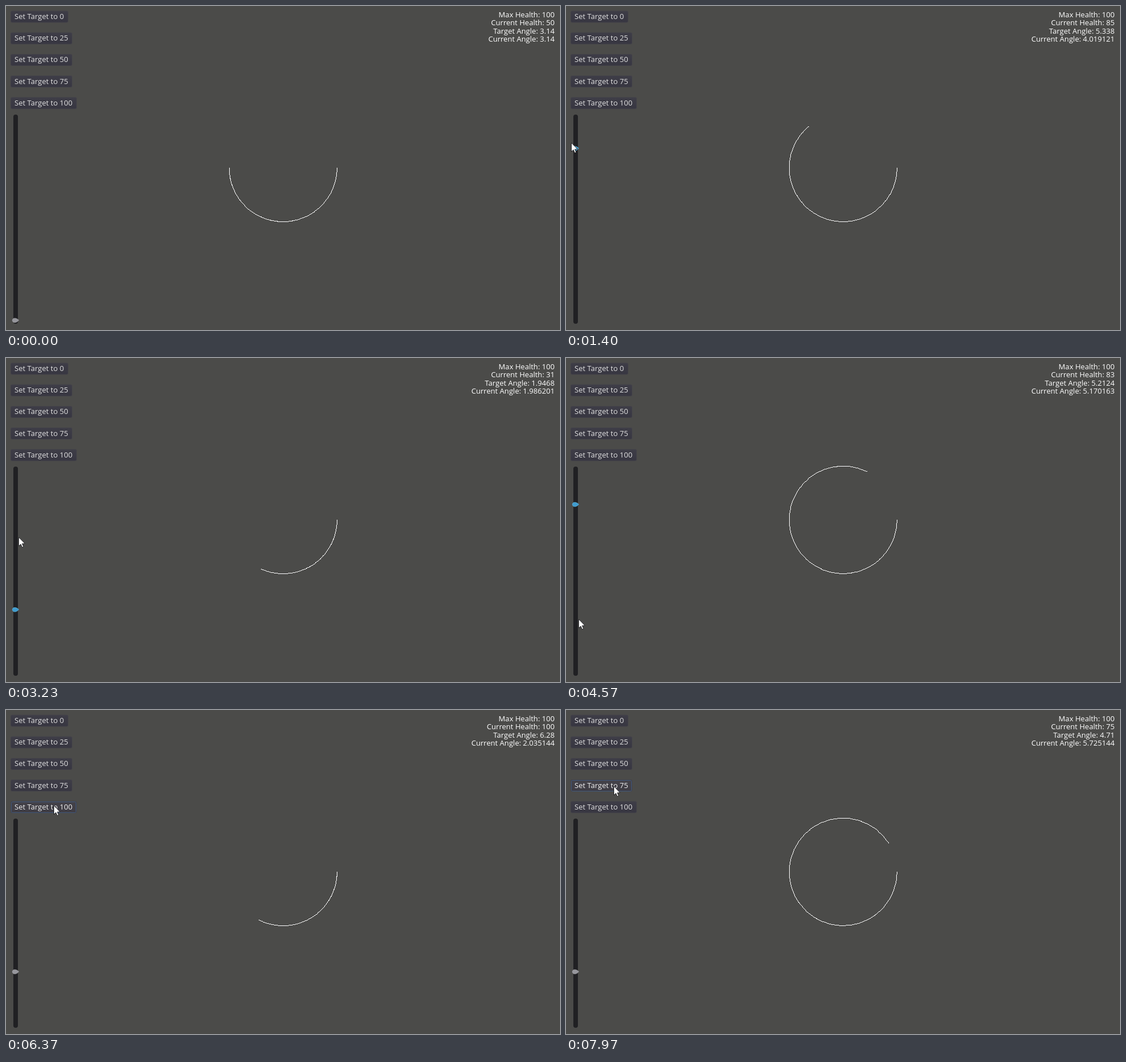
An HTML page with a canvas that plays this animation: 978 px wide and 573 px high, repeating every 8000 ms.

```html
<!DOCTYPE html>
<html lang="en">
<head>
<meta charset="utf-8">
<title>Health arc</title>
<style>
  html, body { margin: 0; width: 100%; height: 100%; overflow: hidden; background: #4b4b49; }
  canvas { display: block; }
</style>
</head>
<body>
<canvas id="stage" width="978" height="573"></canvas>
<script>
const ctx = document.getElementById('stage').getContext('2d');
const LOOP = 8000, SPEED = 6, TURN = 6.28;
const LEVELS = [0, 25, 50, 75, 100];

// Each click sets the health; the angle then runs at constant speed and rests at `rest`.
const clicks = [
  { at: 1253.4798, health: 85, rest: 5.319121, focus: 'slider' },
  { at: 2310, health: 31, rest: 1.986201, focus: 'slider' },
  { at: 3780, health: 83, rest: 5.170163, focus: 'slider' },
  { at: 4590, health: 26, rest: 1.725144, focus: 'slider' },
  { at: 6315, health: 100, rest: 6.18741, focus: 100 },
  { at: 7889.6223, health: 75, rest: 4.68741, focus: 75 }
];

// Pointer path: time, x, y
const path = [
  [430, 4, 292], [800, 8, 262], [1180, 9, 242], [1480, 9, 242],
  [2150, 21, 445], [2800, 22, 445], [3230, 22, 317], [3640, 22, 259],
  [3900, 22, 259], [4480, 22, 462], [4880, 22, 462], [5570, 82, 269],
  [6180, 84, 169], [6600, 84, 169], [7060, 84, 139], [7500, 84, 139], [7800, 84, 135]
];

function stateAt(t) {
  const s = { health: 50, slider: 0, angle: 3.14, focus: null };
  clicks.forEach((c, i) => {
    if (t < c.at) return;
    const end = Math.min(t, i + 1 < clicks.length ? clicks[i + 1].at : LOOP);
    const gap = c.rest - s.angle;
    const travel = SPEED * (end - c.at) / 1000;
    s.angle += Math.sign(gap) * Math.min(Math.abs(gap), travel);
    s.health = c.health;
    s.focus = c.focus;
    if (c.focus === 'slider') s.slider = c.health;
  });
  return s;
}

function pointerAt(t) {
  if (t < path[0][0]) return null;
  const i = path.findIndex(p => p[0] > t);
  if (i < 0) return path[path.length - 1].slice(1);
  const [t0, x0, y0] = path[i - 1], [t1, x1, y1] = path[i];
  const u = (t - t0) / (t1 - t0), e = u * u * (3 - 2 * u);
  return [x0 + (x1 - x0) * e, y0 + (y1 - y0) * e];
}

function roundBox(x, y, w, h, r) {
  ctx.beginPath();
  ctx.roundRect(x, y, w, h, r);
}

function label(text, x, y, color, align) {
  ctx.font = '13.1px "Open Sans", "Noto Sans", sans-serif';
  ctx.fillStyle = color;
  ctx.textAlign = align;
  ctx.fillText(text, x, y);
}

function drawButton(level, i, focus, mouse) {
  const y = 9 + i * 38.2;
  const w = level === 0 ? 101 : level === 100 ? 116 : 108;
  const hover = mouse && mouse[0] > 8 && mouse[0] < 8 + w && mouse[1] > y && mouse[1] < y + 20;
  roundBox(8, y - 0.5, w + 1, 21, 3);
  ctx.fillStyle = '#424148';
  ctx.fill();
  const g = ctx.createLinearGradient(0, y, 0, y + 20);
  g.addColorStop(0, hover ? '#444249' : '#3e3d47');
  g.addColorStop(1, hover ? '#3e3c44' : '#373641');
  roundBox(9, y + 0.5, w - 1, 19, 2);
  ctx.fillStyle = g;
  ctx.fill();
  if (focus === level || hover) {
    roundBox(9.5, Math.round(y) + 0.5, w - 2, 19, 2);
    ctx.strokeStyle = focus === level ? '#41597d' : '#54505f';
    ctx.lineWidth = 1;
    ctx.stroke();
  }
  label('Set Target to ' + level, 15, Math.round(23 + i * 38.2), hover ? '#f0f0f0' : '#e0e0e0', 'left');
}

function drawSlider(value, focused) {
  roundBox(13, 192, 8, 370, 4);
  ctx.fillStyle = '#202023';
  ctx.fill();
  const y = 556 - value * 3.577;
  ctx.beginPath();
  ctx.moveTo(11.3, y);
  ctx.bezierCurveTo(11.3, y - 5, 18, y - 5, 22.5, y - 0.4);
  ctx.bezierCurveTo(19, y + 5, 11.3, y + 5, 11.3, y);
  ctx.fillStyle = focused ? '#409ccf' : '#96969c';
  ctx.fill();
  ctx.strokeStyle = focused ? '#5cb2d8' : '#a4a4a8';
  ctx.lineWidth = 0.8;
  ctx.stroke();
}

// Hard-edged line, one pixel wide
function pixelLine([x0, y0], [x1, y1]) {
  const n = Math.ceil(Math.max(Math.abs(x1 - x0), Math.abs(y1 - y0), 1));
  for (let i = 0; i <= n; i++) {
    ctx.fillRect(Math.floor(x0 + (x1 - x0) * i / n), Math.floor(y0 + (y1 - y0) * i / n), 1, 1);
  }
}

function drawArc(angle) {
  const steps = 32;
  const point = i => {
    const a = angle * i / steps;
    return [489.2 + 95.2 * Math.cos(a), 286.3 + 95.2 * Math.sin(a)];
  };
  ctx.fillStyle = '#fff';
  for (let i = 0; i < steps; i++) pixelLine(point(i), point(i + 1));
}

function drawPointer([x, y]) {
  ctx.save();
  ctx.translate(Math.round(x) + 0.5, Math.round(y));
  ctx.beginPath();
  ctx.moveTo(0, 0);
  [[0, 15.6], [3.6, 12.3], [6, 17.8], [8.4, 16.8], [6.1, 11.4], [10.8, 11]]
    .forEach(p => ctx.lineTo(...p));
  ctx.closePath();
  ctx.fillStyle = '#fff';
  ctx.fill();
  ctx.strokeStyle = '#18181c';
  ctx.lineWidth = 0.9;
  ctx.stroke();
  ctx.restore();
}

function draw(now) {
  // Hold each picture for one thirtieth of a second.
  const t = Math.floor(((now % LOOP) + 4) * 0.03) / 0.03 % LOOP;
  const s = stateAt(t), mouse = pointerAt(t);
  const num = v => String(Number(v.toFixed(6)));

  ctx.fillStyle = '#4b4b49';
  ctx.fillRect(0, 0, 978, 573);
  drawArc(s.angle);
  LEVELS.forEach((level, i) => drawButton(level, i, s.focus, mouse));
  drawSlider(s.slider, s.focus === 'slider');
  [
    'Max Health: 100',
    'Current Health: ' + s.health,
    'Target Angle: ' + num(s.health / 100 * TURN),
    'Current Angle: ' + num(s.angle)
  ].forEach((line, i) => label(line, 968.5, Math.round(20 + i * 14.3), '#fff', 'right'));
  if (mouse) drawPointer(mouse);
}

const start = performance.now();
function tick() {
  draw(performance.now() - start);
  requestAnimationFrame(tick);
}
tick();
</script>
</body>
</html>
```
